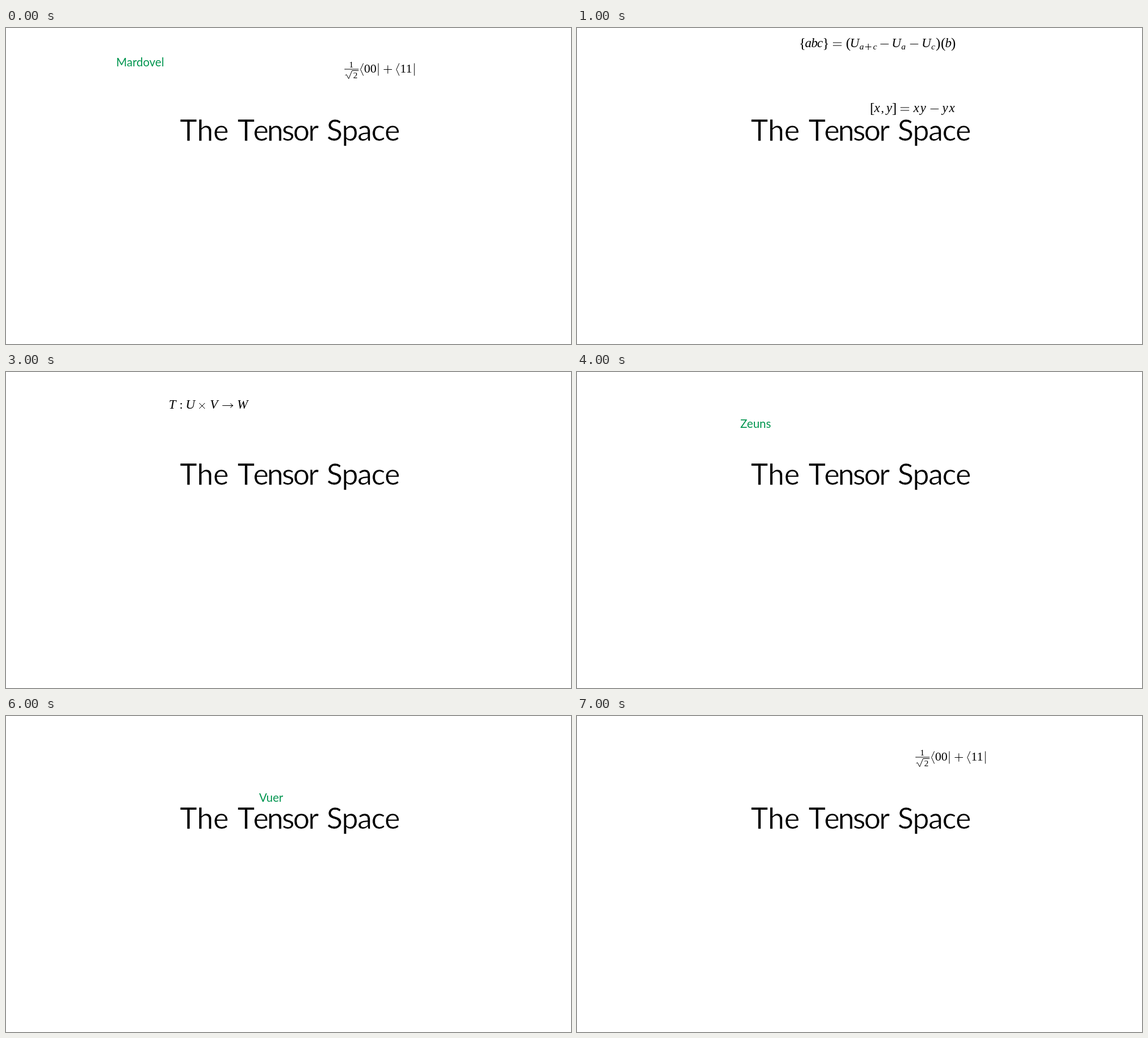
Animation of 1000 by 560 pixels, one loop 8 s. Source, as an HTML page:

```html
<!DOCTYPE html>
<html lang="en">
<head>
<meta charset="utf-8">
<style>
  html, body { margin: 0; width: 100%; height: 100%; overflow: hidden; background: #fff; }
  svg { display: block; width: 100vw; height: 100vh; }
  text { font: 22px "Liberation Serif", serif; }
  path, circle { fill: none; stroke: #000; stroke-width: 1; }
  /* the white outline thins the letters */
  .title { font: 52px Lato, sans-serif; font-kerning: none; stroke: #fff; stroke-width: .7; }
  .name { font: 20.5px Lato, sans-serif; fill: #00954f; }
  .var { font-size: 23px; font-style: italic; }
  .sub { font-size: 15.5px; }
  .fence { font-size: 25px; }
</style>
</head>
<body>
<svg id="stage" viewBox="0 0 1000 560"></svg>
<script>
const text = (cls, x, y, s, extra = '') => `<text class="${cls}" x="${x}" y="${y}" ${extra}>${s}</text>`;
const path = d => `<path d="${d}"/>`;
const name = (x, y, s) => text('name', x, y, s);
const word = (x, s, gap) => text('title', x, 199.5, s, `letter-spacing="${gap}"`);

// Places [x, string] pairs on one baseline
const row = (cls, y, ...items) => items.map(([x, s]) => text(cls, x, y, s)).join('');
const num = (y, ...items) => row('num', y, ...items);
const vars = (y, ...items) => row('var', y, ...items);
const subs = (y, ...items) => row('var sub', y, ...items);
const fences = (y, ...items) => row('fence', y + 1, ...items);

// Operators sit on the math axis, 5.5 above the baseline
const minus = (x, y) => path(`M${x} ${y - 5.5}h14.6`);
const equals = (x, y) => path(`M${x} ${y - 8}h15.4m0 5h-15.4`);
const plus = (x, y, w = 14.6) => path(`M${x} ${y - w * .375}h${w}m${-w / 2} ${-w / 2}v${w}`);
const bra = (x, y) => path(`M${x + 5} ${y - 16.5}l-5 11l5 11`);
const bar = (x, y) => path(`M${x} ${y - 16.5}v22`);
const bracket = (x, dir) => path(`M${x + 4 * dir} 221.5h${-4 * dir}v51.5h${4 * dir}`);

const ket = () =>
  num(79, [633.8, '00'], [697.5, '11']) +
  text('sub', 607.3, 70, '1') + text('sub', 614.5, 88.5, '2') +
  path('M599 73H624') + path('M600.5 84l2 -1.5l4 7.5L612.5 75.5H624') +
  bra(627.5, 79) + bar(659, 79) + plus(668.5, 79) + bra(691, 79) + bar(722.8, 79);

const triple = () =>
  fences(34, [393, '{'], [434.5, '}'], [476, '('], [635, ')'], [644, '('], [662, ')']) +
  vars(34, [403.5, 'a'], [414.5, 'b'], [425, 'c'], [483, 'U'], [557, 'U'], [610, 'U'], [651.5, 'b']) +
  subs(37.5, [500, 'a'], [524, 'c'], [574, 'a'], [627, 'c']) +
  plus(510, 37.5, 11) + equals(453, 34) + minus(537, 34) + minus(589.5, 34);

const commutator = () =>
  fences(149, [518.5, '['], [557.5, ']']) +
  vars(149, [526, 'x'], [547.5, 'y'], [595.5, 'x'], [607.5, 'y'], [646.5, 'y'], [658.5, 'x']) +
  num(149, [538, ',']) + equals(572.5, 149) + minus(625.5, 149);

const map = () =>
  vars(65, [288, 'T'], [318, 'U'], [361, 'V'], [409, 'W']) + num(65, [307, ':']) +
  path('M342 55l10 10m0 -10l-10 10') + path('M383 59.5h19m-4.5 -4q1 3 4.5 4q-3.5 1 -4.5 4');

const matrices = () =>
  bracket(168.5, 1) + bracket(241.5, -1) + bracket(280.5, 1) + bracket(338.5, -1) +
  num(240.5, [175, '1'], [216.5, '1'], [286.5, '0'], [319.5, '1']) +
  num(267, [175, '1'], [224.5, '1'], [286.5, '1'], [319.5, '0']) +
  minus(208.5, 267) +
  '<circle cx="261.3" cy="247.5" r="7.3"/>' + path('M256.1 242.3l10.4 10.4m0 -10.4l-10.4 10.4');

const scenes = [
  name(195, 68, 'Mardovel') + ket(),
  triple() + commutator(),
  name(760, 80.5, 'Rouphy'),
  map(),
  name(289, 99, 'Zeuns'),
  matrices(),
  name(448, 152, 'Vuer'),
  ket()
];

const stage = document.getElementById('stage');
stage.innerHTML = word(307.5, 'The', -.2) + word(409.5, 'Tensor', -2.8) + word(567.5, 'Space', -1.4) +
  scenes.map(s => `<g display="none">${s}</g>`).join('');
const groups = stage.querySelectorAll('g');
const start = performance.now();

function draw() {
  const now = Math.floor((performance.now() - start) / 1000) % scenes.length;
  groups.forEach((g, i) => g.setAttribute('display', i === now ? 'inline' : 'none'));
  requestAnimationFrame(draw);
}
draw();
</script>
</body>
</html>
```
